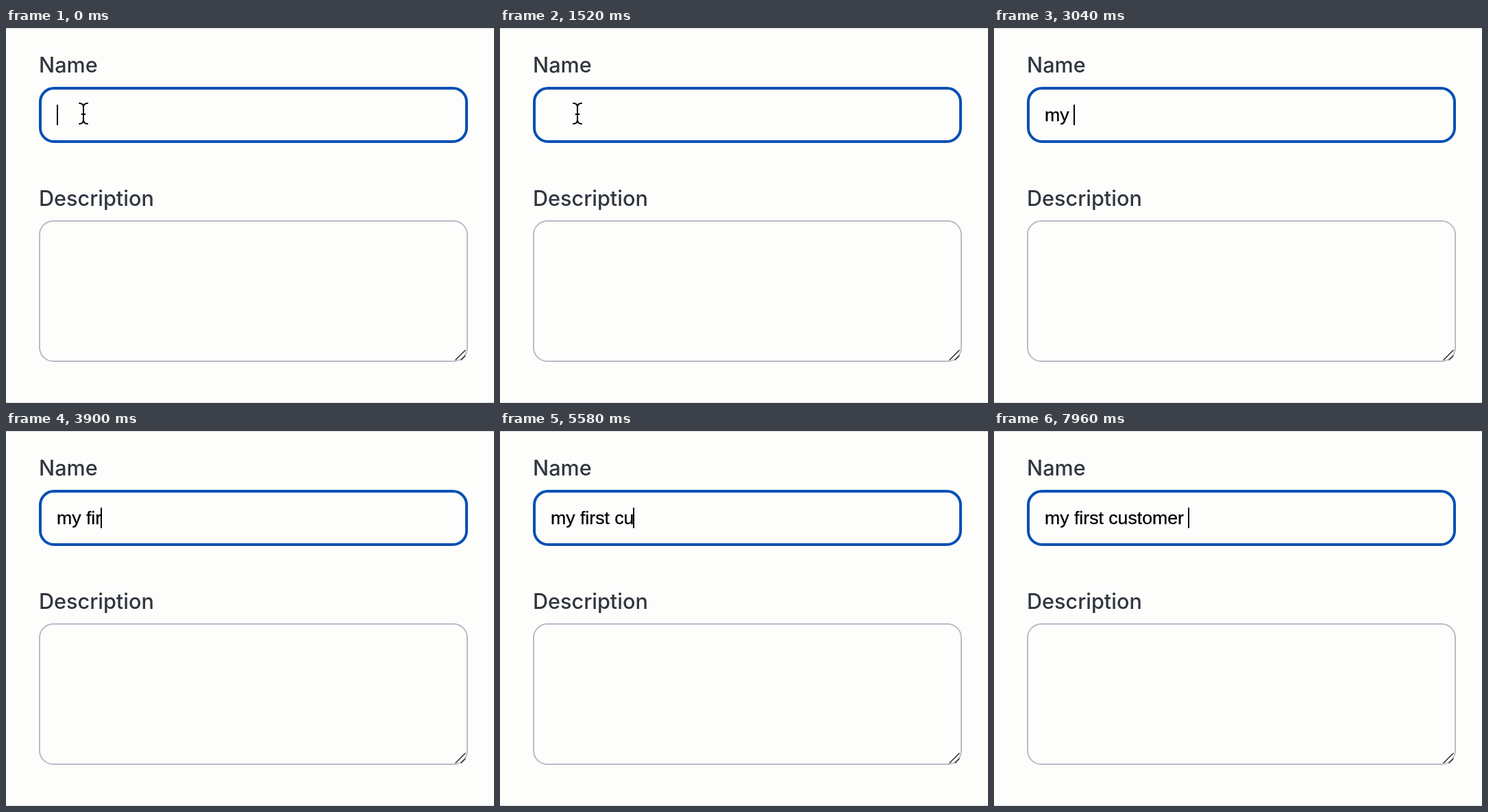
Animation, 712 px wide and 548 px high, one loop 8 s. Source, as an HTML page:

```html
<!DOCTYPE html>
<html lang="en">
<head>
<meta charset="utf-8">
<title>Typing into a form</title>
<style>
  html, body { margin: 0; width: 100%; height: 100%; overflow: hidden; background: #fdfdfb; }
  svg { display: block; width: 712px; height: 548px; }
  .label { font: 450 30.6px Inter, sans-serif; fill: #30363f; }
  #typed { font: 26.667px "Liberation Sans", Arial, sans-serif; white-space: pre; stroke: #000; stroke-width: 0.3; }
  .line { fill: none; stroke-linecap: round; }
</style>
</head>
<body>
<svg viewBox="0 0 712 548">
  <defs>
    <path id="beam" d="M107 110Q113 110 113 116Q113 110 119 110M113 116V134M107 140Q113 140 113 134Q113 140 119 140M110.5 126H115.5"/>
  </defs>

  <rect width="712" height="1" fill="#d8dade"/>
  <rect y="547" width="712" height="1" fill="#d8dade"/>

  <text class="label" x="48" y="65">Name</text>
  <rect x="50" y="88" width="622" height="78" rx="20" fill="none" stroke="#0550b4" stroke-width="4"/>
  <text id="typed" x="74" y="136"></text>
  <rect id="caret" y="112" width="2" height="30"/>

  <text class="label" x="48" y="260">Description</text>
  <rect x="49" y="282" width="624" height="205" rx="20" fill="none" stroke="#b6bcc8" stroke-width="2"/>
  <path class="line" d="M656 485L670 471M664 485L670 479" stroke="#333" stroke-width="1.6"/>

  <g id="pointer" class="line">
    <use href="#beam" stroke="#fff" stroke-width="4"/>
    <use href="#beam" stroke="#000" stroke-width="2"/>
  </g>
</svg>
<script>
  const LOOP = 8000;
  const MESSAGE = "my first customer ";
  const TYPING_START = 2300;
  const KEY_INTERVAL = 313;
  const BLINK_OFF = 780;
  const BLINK_ON = 1780;
  const TEXT_LEFT = 74;

  const typed = document.getElementById("typed");
  const caret = document.getElementById("caret");
  const pointer = document.getElementById("pointer");
  const measure = document.createElement("canvas").getContext("2d");
  measure.font = '26.667px "Liberation Sans", Arial, sans-serif';

  const show = (element, visible) => element.setAttribute("visibility", visible ? "visible" : "hidden");

  function draw(time) {
    const keys = Math.max(0, Math.floor((time - TYPING_START) / KEY_INTERVAL) + 1);
    const text = MESSAGE.slice(0, keys);
    const end = Math.round(TEXT_LEFT + measure.measureText(text).width) - 1;
    typed.textContent = text;
    caret.setAttribute("x", Math.max(TEXT_LEFT, end));
    show(caret, time < BLINK_OFF || time >= BLINK_ON);
    show(pointer, keys === 0);
  }

  const start = performance.now();
  function tick() {
    draw((performance.now() - start) % LOOP);
    requestAnimationFrame(tick);
  }
  tick();
</script>
</body>
</html>
```
